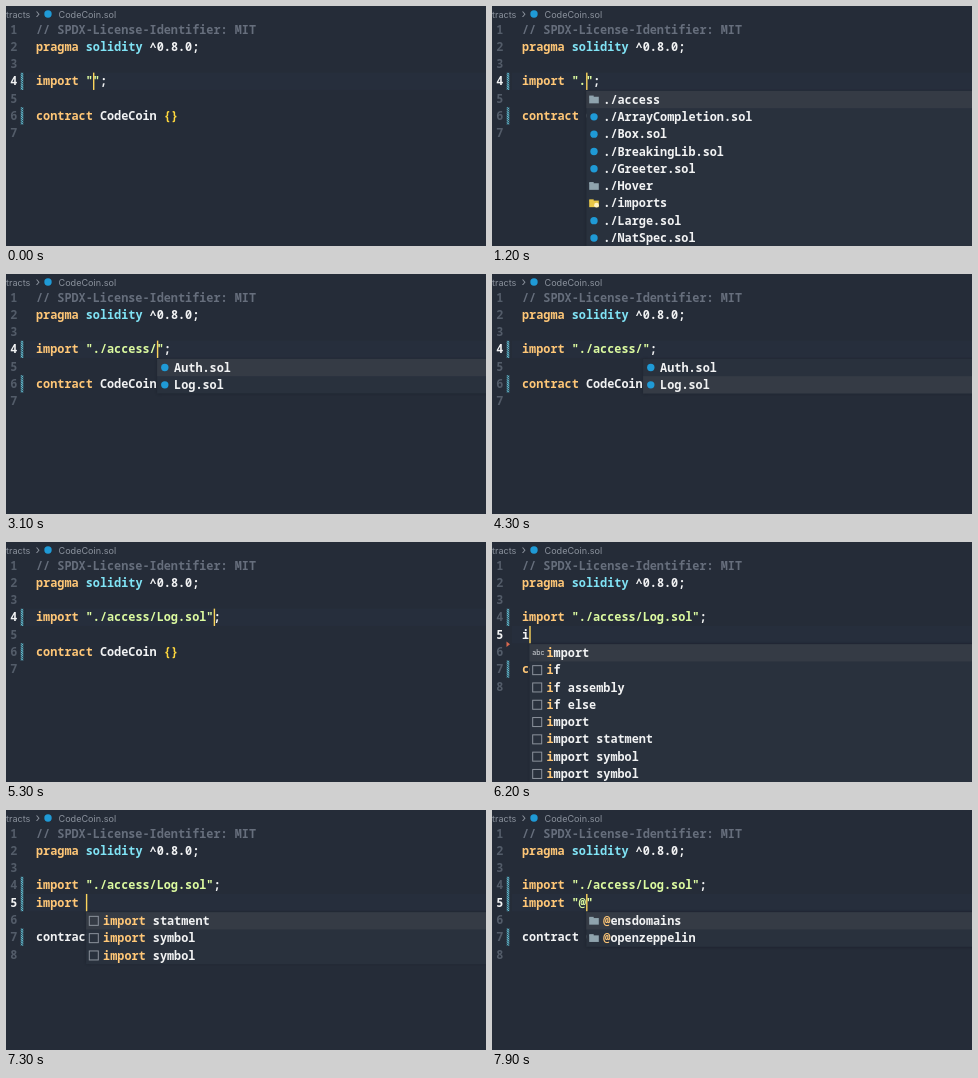
These frames come from a looping animation (480 by 240 pixels, 8000 ms). An HTML page with a canvas:

```html
<!DOCTYPE html>
<html lang="en">
<head>
<meta charset="utf-8">
<title>Import completion</title>
<style>
  html, body { margin: 0; width: 100%; height: 100%; overflow: hidden; background: #252c38; }
  canvas { display: block; }
</style>
</head>
<body>
<canvas id="stage" width="480" height="240"></canvas>
<script>
const ctx = document.getElementById('stage').getContext('2d');
const LOOP = 8000, LEFT = 30, ADVANCE = 7.1, PITCH = 17.3;
const MONO = '11.83px "Noto Sans Mono", monospace';
const color = {
  back: '#252c38', line: '#262e3c', popup: '#29313d', selected: '#353b45',
  text: '#f1f2f3', dim: '#535c69', comment: '#666e7c', crumb: '#8a919c',
  keyword: '#ffc777', cyan: '#80e3f5', string: '#dcfba0', brace: '#ffd83d',
  cursor: '#fbd45c', file: '#1f9ad6', folder: '#8fa3ad', special: '#e8c748'
};

// Completion entries: [icon, label]
const file = label => ['file', label], folder = label => ['folder', label], snippet = label => ['snippet', label];
const files = [
  folder('./access'), file('./ArrayCompletion.sol'), file('./Box.sol'), file('./BreakingLib.sol'),
  file('./Greeter.sol'), folder('./Hover'), ['special', './imports'], file('./Large.sol'), file('./NatSpec.sol')
];
const accessFiles = [file('Auth.sol'), file('Log.sol')];
const packages = [folder('@ensdomains'), folder('@openzeppelin')];
const words = [
  ['word', 'import'], snippet('if'), snippet('if assembly'), snippet('if else'), snippet('import'),
  snippet('import statment'), snippet('import symbol'), snippet('import symbol'), snippet('immutable')
];
const statements = words.slice(5, 8);

const typeWord = (at, text) => ({
  at, line: 5, text, col: text.length, anchor: 1, match: text,
  list: words.filter(([, label]) => label.startsWith(text))
});
const LOG_IMPORT = 'import "./access/Log.sol";';

// Each edit also restarts the cursor blink.
const edits = [
  { at: -200, line: 4, text: 'import "";', col: 8 },
  { at: 1000, line: 4, text: 'import ".";', col: 9, list: files },
  { at: 1800, line: 4, text: 'import "./access";', col: 16 },
  { at: 2700, line: 4, text: 'import "./access/";', col: 17, list: accessFiles, nextRowAt: 3400 },
  { at: 4500, line: 4, text: LOG_IMPORT, col: 24 },
  { at: 5200, line: 4, text: LOG_IMPORT, col: 25 },
  { at: 5500, line: 4, text: LOG_IMPORT, col: 26 },
  { at: 5700, line: 5, text: '', col: 0 },
  typeWord(6100, 'i'),
  typeWord(6300, 'im'),
  typeWord(6500, 'imp'),
  typeWord(6600, 'impo'),
  typeWord(6700, 'impor'),
  typeWord(6800, 'import'),
  { at: 7000, line: 5, text: 'import ', col: 7, list: statements, match: 'import' },
  { at: 7500, line: 5, text: 'import ""', col: 8, list: files },
  { at: 7800, line: 5, text: 'import "@"', col: 9, list: packages, match: '@' }
];

const lineY = n => 23.4 + (n - 1) * PITCH;
const colX = col => LEFT + col * ADVANCE;

function rect(x, y, w, h, fill) {
  ctx.fillStyle = fill;
  ctx.fillRect(x, y, w, h);
}

function circle(x, y, r, fill) {
  ctx.fillStyle = fill;
  ctx.beginPath();
  ctx.arc(x, y, r, 0, 7);
  ctx.fill();
}

function label(text, x, y, fill, font) {
  ctx.font = font;
  ctx.fillStyle = fill;
  ctx.fillText(text, x, y);
}

function code(x, y, parts, weight = 700) {
  for (const [text, fill] of parts) {
    label(text, x, y + 4.1, fill, `${weight} ${MONO}`);
    x += text.length * ADVANCE;
  }
}

function importParts(text) {
  if (!text.startsWith('import')) return [[text, color.text]];
  const [, string, end] = text.slice(6).match(/^([^;]*)(;?)$/);
  return [['import', color.keyword], [string, color.string], [end, color.text]];
}

function gutterMark(n) {
  const y = lineY(n) - PITCH / 2;
  ctx.save();
  ctx.beginPath();
  ctx.rect(14.7, y, 2.6, PITCH);
  ctx.clip();
  ctx.strokeStyle = '#62bfd4';
  ctx.lineWidth = 1.1;
  ctx.beginPath();
  for (let d = -3; d < PITCH + 3; d += 2.2) {
    ctx.moveTo(14, y + d);
    ctx.lineTo(19, y + d + 4);
  }
  ctx.stroke();
  ctx.restore();
}

function removedMark() {
  ctx.fillStyle = '#d9694f';
  ctx.beginPath();
  ctx.moveTo(14.5, 99.5);
  ctx.lineTo(18, 102.3);
  ctx.lineTo(14.5, 105);
  ctx.fill();
}

function icon(kind, x, y) {
  if (kind === 'file') circle(x, y, 3.7, color.file);
  else if (kind === 'word') label('abc', x - 5, y + 2.5, '#d5d8dc', '7px Inter, sans-serif');
  else if (kind === 'snippet') {
    ctx.strokeStyle = '#8b929c';
    ctx.lineWidth = 1;
    ctx.strokeRect(x - 4.5, y - 4.5, 9, 9);
  } else {
    const fill = color[kind];
    rect(x - 4.8, y - 4, 4.5, 2, fill);
    rect(x - 4.8, y - 2.8, 9.6, 6.6, fill);
    if (kind === 'special') circle(x + 2.5, y + 1.8, 2.4, '#fff3c4');
  }
}

function popup(edit, time) {
  const x = colX(edit.anchor ?? edit.col) + 0.4, top = lineY(edit.line) + 9.6;
  const height = edit.list.length * PITCH;
  const selected = time >= edit.nextRowAt ? 1 : 0;
  ctx.save();
  ctx.shadowColor = 'rgba(10, 14, 20, .4)';
  ctx.shadowBlur = 3;
  rect(x, top, 500, height, color.popup);
  ctx.restore();
  rect(x, top + selected * PITCH, 480, PITCH, color.selected);
  edit.list.forEach(([kind, name], i) => {
    const y = top + (i + 0.5) * PITCH;
    const split = (edit.match ?? '').length;
    icon(kind, x + 7.7, y);
    code(x + 17, y, [[name.slice(0, split), color.keyword], [name.slice(split), color.text]]);
  });
}

function draw(time) {
  const edit = edits.findLast(e => e.at <= time);
  const added = edit.line === 5;
  const contractLine = added ? 7 : 6;
  const marked = added && edit.text.length > 1;

  rect(0, 0, 480, 240, color.back);
  rect(20, lineY(edit.line) - PITCH / 2, 460, PITCH, color.line);

  const sans = '9.1px Inter, sans-serif';
  label('tracts', 0, 11.5, color.crumb, sans);
  label('›', 29.5, 11.5, color.crumb, '12px Inter, sans-serif');
  circle(42, 8, 3.7, color.file);
  label('CodeCoin.sol', 52.5, 11.5, color.crumb, sans);

  for (let n = 1; n <= contractLine + 1; n++) {
    const active = n === edit.line;
    code(4.3, lineY(n), [[String(n), active ? color.text : color.dim]], active ? 700 : 600);
  }
  gutterMark(4);
  gutterMark(contractLine);
  if (marked) gutterMark(5);
  else if (added) removedMark();

  code(LEFT, lineY(1), [['// SPDX-License-Identifier: MIT', color.comment]]);
  code(LEFT, lineY(2), [['pragma ', color.keyword], ['solidity ', color.cyan], ['^0.8.0;', color.text]]);
  code(LEFT, lineY(4), importParts(added ? LOG_IMPORT : edit.text));
  if (added) code(LEFT, lineY(5), importParts(edit.text));
  const broken = added && edit.text.startsWith('import');
  code(LEFT, lineY(contractLine), [
    ['contract ', broken ? color.text : color.keyword], ['CodeCoin ', color.text], ['{}', color.brace]
  ]);

  if (edit.list) popup(edit, time);
  if ((time - edit.at) % 1000 < 500) {
    rect(colX(edit.col) + 0.2, lineY(edit.line) - PITCH / 2, 1.4, PITCH, color.cursor);
  }
}

function frame() {
  draw(performance.now() % LOOP);
  requestAnimationFrame(frame);
}
frame();
</script>
</body>
</html>
```
